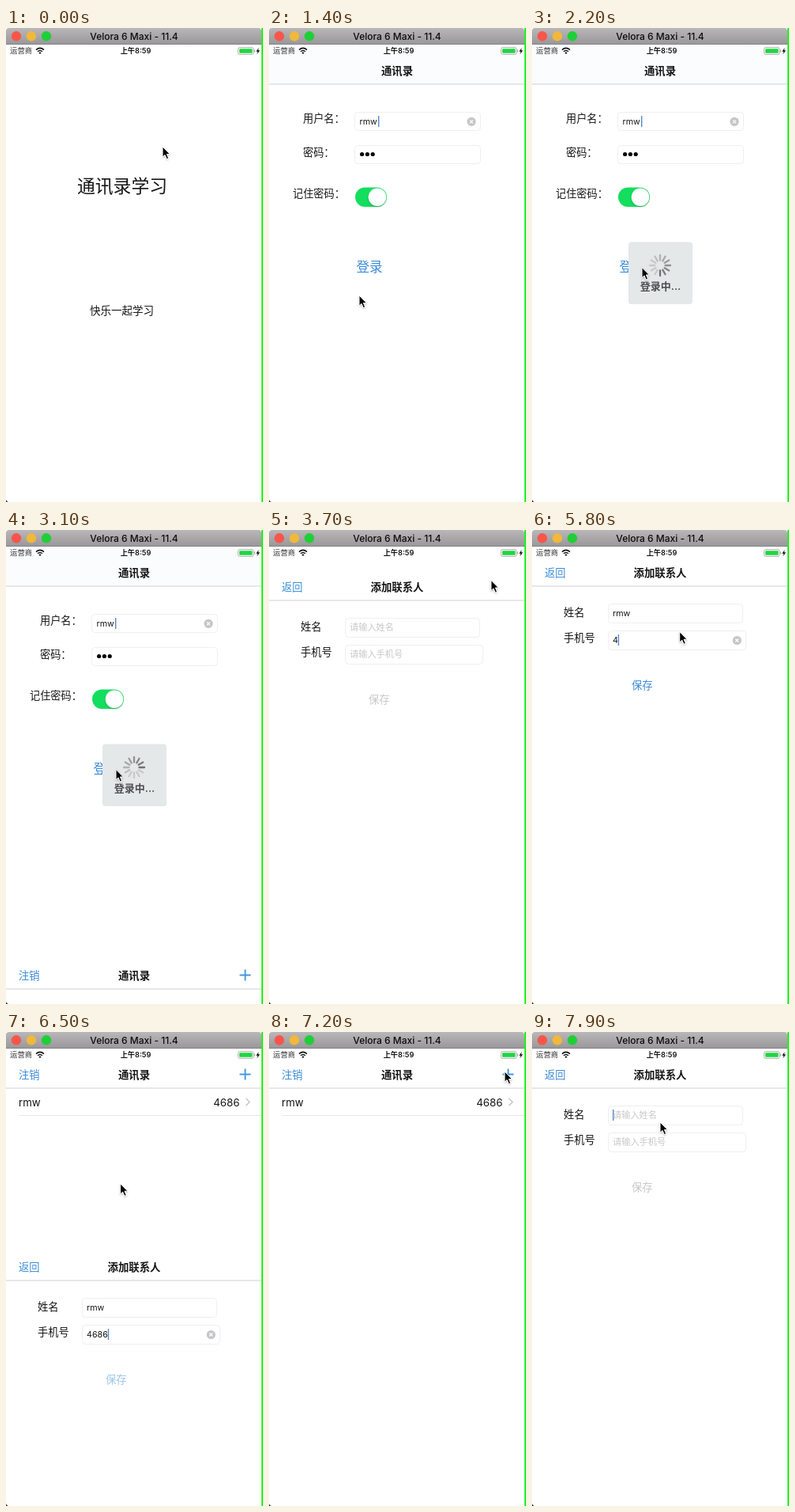
Animation of 325x599 px, one loop 8000 ms. Source, as an HTML page:

```html
<!DOCTYPE html>
<html lang="zh-CN">
<head>
<meta charset="utf-8">
<title>通讯录</title>
<style>
html, body { margin: 0; width: 100%; height: 100%; overflow: hidden; background: #fff; }
svg { display: block; width: 325px; height: 599px; }
text { font-family: Inter, "Noto Sans CJK SC", "Noto Sans CJK", "Noto Sans", sans-serif; white-space: pre; }
</style>
</head>
<body>
<svg id="stage" viewBox="0 0 325 599" xmlns="http://www.w3.org/2000/svg">
  <defs>
    <linearGradient id="chrome" x2="0" y2="1">
      <stop offset="0" stop-color="#b9b7b9"/><stop offset="1" stop-color="#999799"/>
    </linearGradient>
    <filter id="shade" x="-40%" y="-40%" width="180%" height="180%">
      <feDropShadow dx="0" dy="1" stdDeviation="1" flood-opacity=".28"/>
    </filter>
    <clipPath id="screenClip"><rect y="21" width="323" height="578"/></clipPath>
  </defs>
  <rect width="325" height="599" fill="#fff"/>
  <g id="screen" clip-path="url(#screenClip)"></g>
  <g id="frame"></g>
  <path id="pointer" d="M0 0V13.2L3 10.4L5.3 15.6L7.6 14.6L5.4 9.5H9.4Z" fill="#000" stroke="#fff" stroke-width="1" filter="url(#shade)"/>
</svg>
<script>
const LOOP = 8000, STEP = 100, SCREEN_H = 578;
const BLUE = '#3a8cd9', GRAY = '#c8c8cb', INK = '#161616';
const USER = 'rmw', PHONE = '4686';
const byId = id => document.getElementById(id);

// Text placed by its vertical centre.
const label = (str, x, cy, size, { fill = INK, anchor = 'start', weight = 400 } = {}) =>
  `<text x="${x}" y="${cy + size * 0.35}" font-size="${size}" fill="${fill}" text-anchor="${anchor}" font-weight="${weight}">${str}</text>`;
const rect = (x, y, w, h, fill, extra = '') =>
  `<rect x="${x}" y="${y}" width="${w}" height="${h}" fill="${fill}" ${extra}/>`;
const circle = (x, y, r, fill, extra = '') =>
  `<circle cx="${x}" cy="${y}" r="${r}" fill="${fill}" ${extra}/>`;
const path = (d, stroke, width, extra = '') =>
  `<path d="${d}" fill="none" stroke="${stroke}" stroke-width="${width}" ${extra}/>`;

const field = (x, y, w, h) => rect(x + .5, y + .5, w - 1, h - 1, '#fff', 'rx="4" stroke="#efefef"');
const caret = (x, cy) => rect(x, cy - 7, 1.4, 14, '#5b8aca');
const clearIcon = (x, y) => circle(x, y, 5.6, '#c6c6ca') +
  path(`M${x - 2} ${y - 2}l4 4m0 -4l-4 4`, '#fff', 1.2);

const navBar = (title, { left = '', plus = false, fill = '#fff' } = {}) =>
  rect(0, 21, 323, 50, fill) + rect(0, 70.5, 323, 1, '#d2d2d4') +
  label(title, 162, 54, 13.4, { anchor: 'middle', weight: 600 }) +
  label(left, 16, 54, 13.3, { fill: BLUE }) +
  (plus ? path('M295.5 53.5h14m-7 -7v14', '#4496e4', 1.9) : '');

const sheet = (content, offset) =>
  `<g transform="translate(0 ${Math.round(offset)})">${rect(0, 21, 323, SCREEN_H, '#fff')}${content}</g>`;

const launchView = () =>
  label('通讯录学习', 147, 200, 22.8, { anchor: 'middle' }) +
  label('快乐一起学习', 146.5, 357.5, 13.5, { anchor: 'middle' });

function spinner(t) {
  const head = 3 + (t - 3100) / STEP;
  let spokes = '';
  for (let i = 0; i < 12; i++) {
    const age = ((head - i) % 12 + 12) % 12;
    const tone = Math.min(200, 112 + age * 11);
    spokes += path('M0 -6.5V-13', `rgb(${tone},${tone},${tone})`, 2.3,
      `stroke-linecap="round" transform="translate(162 300) rotate(${i * 30})"`);
  }
  return spokes;
}

const hud = t => rect(122, 270.5, 81, 78.5, '#e5e8e9', 'rx="3.5"') + spinner(t) +
  label('登录中...', 162.5, 326.5, 13, { fill: '#4c4e50', anchor: 'middle', weight: 600 });

function loginView(t) {
  const pressed = t >= 1800 && t < 2000;
  return navBar('通讯录', { fill: '#fbfcfd' }) +
    label('用户名：', 43, 114.7, 13.2) + label('密码：', 43, 157.5, 13.2) + label('记住密码：', 30, 209.5, 13.2) +
    field(108, 106, 160, 24) + field(108, 148, 160, 24) +
    label(USER, 114.5, 118.2, 10.7) + caret(138, 118) + clearIcon(256, 118.3) +
    [117.6, 124.4, 131.2].map(x => circle(x, 159.5, 2.6, '#000')).join('') +
    rect(109, 201.5, 40, 24.5, '#13de5e', 'rx="12.2"') + circle(137, 213.7, 11.3, '#fff', 'filter="url(#shade)"') +
    label('登录', 110.5, 302, 16.5, { fill: pressed ? '#a9cdee' : BLUE }) +
    (t >= 2000 ? hud(t) : '');
}

const listView = filled => navBar('通讯录', { left: '注销', plus: true }) + (filled
  ? label(USER, 16, 89.2, 13.3) + label(PHONE, 295.5, 89.2, 13.3, { anchor: 'end' }) +
    path('M303.5 84l4.5 4.5l-4.5 4.5', '#c3c3c7', 1.4) + rect(16, 105, 307, 1, '#e6e6e8')
  : '');

const advance = c => ({ r: 4.1, m: 9.5, w: 8.6 })[c] || 6.7;

function input(value, hint, x, cy, clearX, focused) {
  const shown = value ? label(value, x, cy + .2, 10.7) : label(hint, x, cy, 11.2, { fill: GRAY });
  const end = x + [...value].reduce((sum, c) => sum + advance(c), 0);
  return shown + (focused ? caret(end, cy) + (value ? clearIcon(clearX, cy + .5) : '') : '');
}

function addView({ name, phone, focus, pressed }) {
  const ready = name && phone;
  return navBar('添加联系人', { left: '返回' }) +
    label('姓名', 40, 104, 13.3) + label('手机号', 40, 136.5, 13.3) +
    field(96, 93, 171, 25) + field(96, 127, 175, 25) +
    input(name, '请输入姓名', 102, 105, 256, focus === 1) +
    input(phone, '请输入手机号', 102, 139, 259.3, focus === 2) +
    label('保存', 126, 196.8, 13.3, { fill: pressed ? '#9dc6ea' : ready ? BLUE : GRAY });
}

const typed = (str, times, t) => str.slice(0, times.filter(at => t >= at).length);

function addForm(t) {
  if (t >= 7300) return { name: '', phone: '', focus: t >= 7800 ? 1 : 0 };
  return {
    name: typed(USER, [4700, 4800, 5000], t),
    phone: typed(PHONE, [5700, 5900, 6000, 6200], t),
    focus: t >= 5400 ? 2 : t >= 4400 ? 1 : 0,
    pressed: t >= 6400
  };
}

// Critically damped slide, 0 to 1.
function slide(t, start) {
  if (t <= start) return 0;
  const k = (t - start) * 0.018;
  const p = 1 - (1 + k) * Math.exp(-k);
  return p > 0.996 ? 1 : p;
}

function screenAt(t) {
  if (t < 500) return launchView();
  let out = '';
  const listIn = slide(t, 3067);
  if (listIn < 1) out += loginView(t);
  if (listIn > 0) out += sheet(listView(t >= 6400), (1 - listIn) * SCREEN_H);
  const addIn = t >= 7300 ? slide(t, 7320) : slide(t, 3405) - slide(t, 6420.3);
  if (addIn > 0) out += sheet(addView(addForm(t)), (1 - addIn) * SCREEN_H);
  return out;
}

const pointerPath = [
  [0, 198, 150], [600, 198, 150], [1300, 114, 338], [1500, 114, 338], [1800, 139, 302.5],
  [3100, 139, 302.5], [3300, 298, 50], [3500, 298, 50], [4100, 232, 102], [4900, 232, 102],
  [5300, 190, 130], [5800, 186.7, 128.7], [6100, 186.7, 128.7], [6400, 144.6, 191.7], [6600, 144.6, 191.7],
  [7200, 298, 50], [7400, 298, 50], [7800, 162, 114], [8000, 162, 114]
];
function pointerAt(t) {
  const i = pointerPath.findIndex(p => p[0] > t);
  const [t0, x0, y0] = pointerPath[i - 1], [t1, x1, y1] = pointerPath[i];
  const u = (t - t0) / (t1 - t0), e = u * u * (3 - 2 * u);
  return [x0 + (x1 - x0) * e, y0 + (y1 - y0) * e];
}

byId('frame').innerHTML =
  `<path d="M0 20.5V4Q0 0 4 0H319Q323 0 323 4V20.5Z" fill="url(#chrome)"/>` +
  rect(0, 20, 323, 1, '#858385') +
  circle(13, 10.3, 6.2, '#f9554a') + circle(32, 10.3, 6.2, '#f0b83c') + circle(51, 10.3, 6.2, '#1fcf38') +
  label('Velora 6 Maxi - 11.4', 162, 10.7, 12, { anchor: 'middle', fill: '#0c0c0c', weight: 500 }) +
  label('运营商', 5, 29, 9.4, { fill: '#333' }) +
  label('上午8:59', 164, 29, 9.2, { anchor: 'middle', weight: 600 }) +
  path('M38 27.6Q43 23.2 48 27.6M40 29.8Q43 27.2 46 29.8', '#111', 1.5) +
  '<path d="M41.4 31.2Q43 30 44.6 31.2L43 33Z" fill="#111"/>' +
  rect(293.5, 24.7, 19.5, 8.6, '#fff', 'rx="2" stroke="#9a9a9a" stroke-width=".8"') +
  rect(295, 26.2, 16.5, 5.6, '#22d445', 'rx="1"') + rect(313.8, 27.5, 1, 3, '#9a9a9a') +
  '<path d="M319.7 25L316.2 29.8H318.3L317.4 33.2L321 28.3H318.9Z" fill="#111"/>' +
  rect(323, 0, 2, 599, '#1df51d') +
  '<path d="M0 596V599H3Q0.5 598.5 0 596Z" fill="#222"/>';

let lastStep = -1;
function update(now) {
  const t = Math.floor((now % LOOP) / STEP) * STEP;
  if (t !== lastStep) {
    lastStep = t;
    byId('screen').innerHTML = screenAt(t);
    byId('pointer').setAttribute('transform', `translate(${pointerAt(t).join(' ')})`);
  }
}

const start = performance.now();
function tick() {
  update(performance.now() - start);
  requestAnimationFrame(tick);
}
tick();
</script>
</body>
</html>
```
